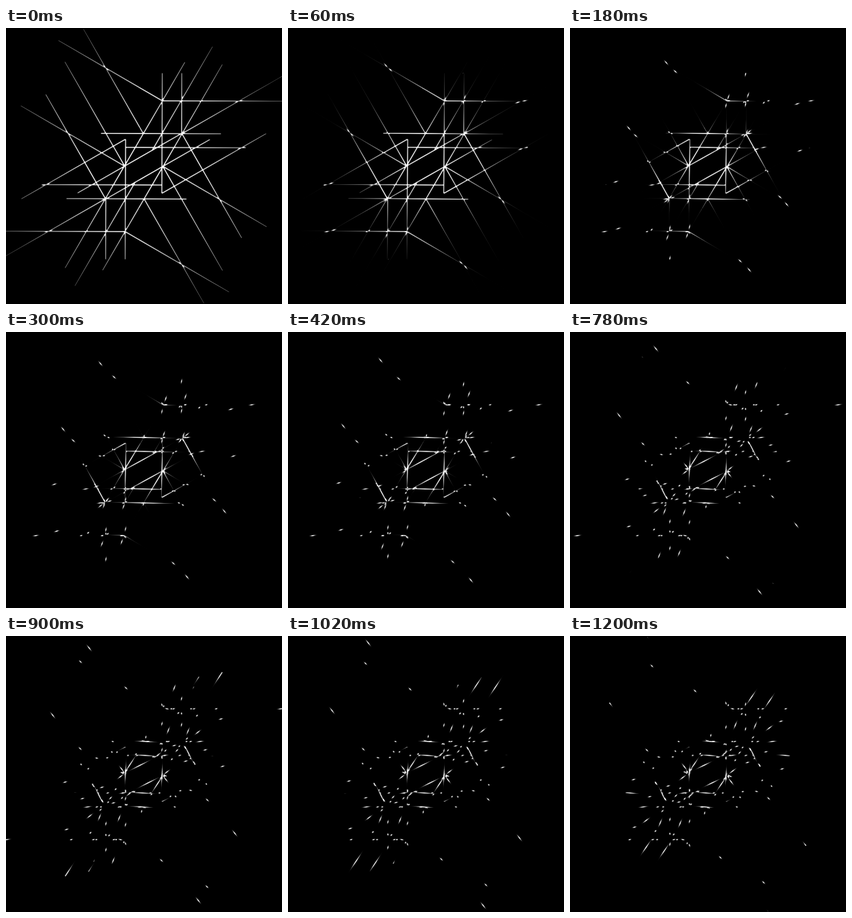
An HTML page that plays this animation: 500 px wide and 500 px high, repeating every 1.26 s.

```html
<!DOCTYPE html>
<html lang="en">
<head>
<meta charset="utf-8">
<title>Line moiré</title>
<style>
  html, body { margin: 0; width: 100%; height: 100%; overflow: hidden; background: #000; }
  svg { display: block; width: 100vw; height: 100vh; }
  .lines { fill: none; stroke: #fff; stroke-width: 2.3; }
  .overlay { mix-blend-mode: multiply; }
  .turn { transform-origin: 0 0; animation: turn 1260ms steps(21) infinite; }
  @keyframes turn {
    from { transform: rotate(.5deg); }
    to { transform: rotate(11deg); }
  }
</style>
</head>
<body>
<svg viewBox="-249.5 -250.4 500 500">
  <defs>
    <!-- Half of the figure; the other half is its point reflection. -->
    <path id="half" d="
      M33 -118.7 l-188.8 -109
      M33 -118.5 h218
      M33 49 v-218
      M33 49 l188.8 -109
      M68.5 -59.2 v-110
      M69 -59.2 l109 188.8
      M69 -59.2 l188.8 -109
      M-78 -59.2 h218
      M-33 -34 h218
      M-1 -59.2 l-109 -188.8
      M15.1 -28.5 l109 -188.8
      M33 3.8 l109 -188.8
      M-69 60 l188.8 -109
      M-35 0 l109 -188.8
      M-34.5 0 l-188.8 -109
      M-34.5 0 l-109 -188.8"/>
    <g id="figure" class="lines">
      <use href="#half"/>
      <use href="#half" transform="rotate(180)"/>
    </g>
    <rect id="back" x="-260" y="-260" width="520" height="520"/>
  </defs>

  <use href="#back"/>
  <use href="#figure"/>

  <!-- Only the places where both layers are white stay lit. -->
  <g class="overlay">
    <use href="#back"/>
    <g class="turn"><use href="#figure"/></g>
  </g>
</svg>
</body>
</html>
```
